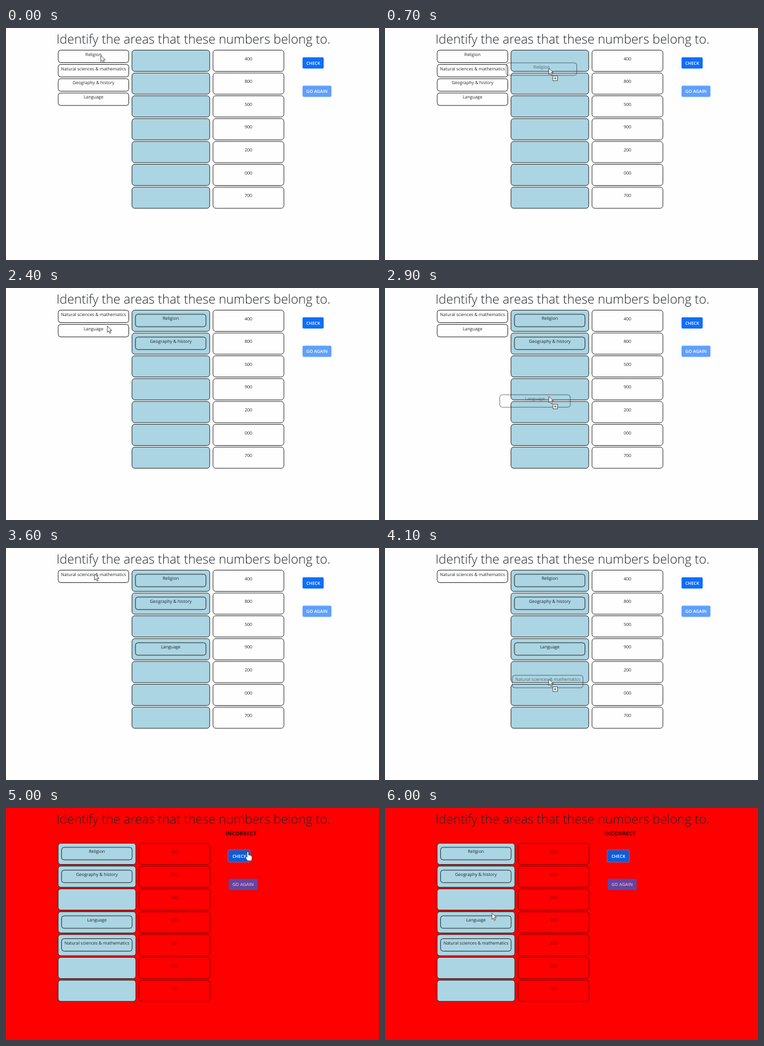
These frames come from a looping animation (600 by 372 pixels, 6.1 s). An HTML page:

```html
<!DOCTYPE html>
<html lang="en">
<head>
<meta charset="utf-8">
<title>Match the numbers</title>
<style>
  html, body { margin: 0; width: 100%; height: 100%; overflow: hidden; background: #fefefe; }
  svg { display: block; width: 600px; height: 372px; background: #fefefe; }
  text { font: 7px "Open Sans", "Noto Sans", sans-serif; fill: #212529; text-anchor: middle; text-rendering: geometricPrecision; }
  .title { font-size: 20.4px; font-weight: 300; }
  .verdict { font-size: 8.8px; font-weight: 700; fill: #3a0508; visibility: hidden; }
  .box { fill: none; stroke: #1c1c1c; stroke-width: .88; }
  .target { fill: #abd5e3; }
  .btn rect { fill: #0d6efd; }
  .btn text { fill: #fff; font-weight: 600; }
  .disabled { opacity: .65; }
  .hover rect { fill: #0b5ed7; }
  .btn .ring { fill: none; stroke: #3184fd; stroke-opacity: .5; stroke-width: 1.8; visibility: hidden; }
  .ghost { opacity: .62; }
  .pointer path, .pointer rect { fill: #fff; stroke: #333; stroke-width: .8; stroke-linejoin: round; }
  .wrong { background: #fe0000; }
  .wrong .value rect { stroke: #700000; }
  .wrong .value text { fill: #8c0008; }
  .wrong .verdict, .wrong .btn .ring { visibility: visible; }
</style>
</head>
<body>
<svg id="stage" viewBox="0 0 600 372">
  <text class="title" x="301.5" y="25">Identify the areas that these numbers belong to.</text>
  <text class="verdict" x="378" y="43.5">INCORRECT</text>
  <g id="board">
    <g class="btn" id="check">
      <rect x="477" y="47" width="34" height="18" rx="1.8"/>
      <rect class="ring" x="476.1" y="46.1" width="35.8" height="19.8" rx="2.6"/>
      <text x="494.2" y="58.6">CHECK</text>
    </g>
    <g class="btn disabled">
      <rect x="477" y="92.4" width="46.5" height="18" rx="1.8"/>
      <text x="500.2" y="104">GO AGAIN</text>
    </g>
  </g>
  <g id="chips"></g>
  <g class="pointer" id="pointer">
    <path id="arrow" d="M0 0V10L2.3 7.9L4 11.8L5.7 11L4 7.2H7.2Z"/>
    <g id="badge">
      <rect x="6.5" y="12.5" width="7.5" height="7.5"/>
      <path d="M8.2 16.25H12.3M10.25 14.2V18.3"/>
    </g>
    <path id="hand" d="M-1.3 9V1.2A1.25 1.25 0 0 1 1.2 1.2V5.4Q2.3 4.6 3.2 5.9Q4.4 5.2 5.1 6.5Q6.8 6.2 6.8 8V11Q6.8 13 5.6 14.8H-.4L-3.6 10Q-4.4 8.4-3.2 8Q-2.2 8-1.3 9Z"/>
  </g>
</svg>
<script>
const LOOP = 6100, STEP = 100, SHIFT_AT = 4200, WRONG_AT = 5000;
const TOP = 35.5, ROW = 36.6, SLOT = 22.9, LEFT = 84;
const $ = id => document.getElementById(id);
const stage = $('stage'), board = $('board');

// In list order; x, y is where the pointer grabs the chip.
const chips = [
  { label: 'Religion', row: 0, grab: 200, drop: 800, x: 152.5, y: 44 },
  { label: 'Natural sciences & mathematics', row: 4, grab: 3600, drop: 4200, x: 142.5, y: 41.5 },
  { label: 'Geography & history', row: 1, grab: 1300, drop: 1800, x: 173, y: 70 },
  { label: 'Language', row: 3, grab: 2400, drop: 3000, x: 163, y: 61 }
];

// The pointer visits every grab and drop, then the button, then drifts off.
const stops = chips.flatMap(c => [
  { t: c.grab, x: c.x, y: c.y },
  { t: c.drop, x: 264, y: TOP + c.row * ROW + 29 }
]).concat(
  { t: 4900, x: 374, y: 55 },
  { t: WRONG_AT, x: 389, y: 70 },
  { t: 6000, x: 172, y: 168.5 }
).sort((a, b) => a.t - b.t);

function pointerAt(t) {
  const i = stops.findIndex(s => s.t > t);
  if (i < 1) return stops.at(i);
  const a = stops[i - 1], b = stops[i];
  const k = 1 - (1 - (t - a.t) / (b.t - a.t)) ** 3;
  return { x: a.x + (b.x - a.x) * k, y: a.y + (b.y - a.y) * k };
}

function add(parent, tag, attrs, label) {
  const el = document.createElementNS('http://www.w3.org/2000/svg', tag);
  for (const key in attrs) el.setAttribute(key, attrs[key]);
  if (label) el.textContent = label;
  return parent.appendChild(el);
}

function move(el, x, y) {
  el.setAttribute('transform', `translate(${x} ${y})`);
}

function show(el, on) {
  el.style.display = on ? '' : 'none';
}

function makeChip(label, cls) {
  const g = add($('chips'), 'g', { class: cls });
  add(g, 'rect', { class: 'box', width: 113.5, height: 20, rx: 4 });
  add(g, 'text', { x: 56.8, y: 9.2 }, label);
  return g;
}

['400', '800', '500', '900', '200', '000', '700'].forEach((number, i) => {
  const y = TOP + i * ROW;
  add(board, 'rect', { class: 'box target', x: 202.7, y, width: 125, height: 34, rx: 4.4 });
  const g = add(board, 'g', { class: 'value' });
  add(g, 'rect', { class: 'box', x: 333, y, width: 114, height: 34, rx: 4.4 });
  add(g, 'text', { x: 390, y: y + 16 }, number);
});

for (const chip of chips) chip.el = makeChip(chip.label, 'chip');
for (const chip of chips) chip.ghost = makeChip(chip.label, 'ghost');

function render(t) {
  const wrong = t >= WRONG_AT;
  const dx = t >= SHIFT_AT ? -118.8 : 0, dy = wrong ? 21 : 0;
  const p = pointerAt(t);
  let slot = 0, dragging = false;

  stage.classList.toggle('wrong', wrong);
  move(board, dx, dy);

  for (const chip of chips) {
    const held = t > chip.grab && t < chip.drop;
    show(chip.ghost, held);
    if (t >= chip.drop) {
      move(chip.el, 208.2 + dx, TOP + 6.6 + chip.row * ROW + dy);
      continue;
    }
    const y = TOP + SLOT * slot++;
    move(chip.el, LEFT, y);
    if (held) {
      move(chip.ghost, LEFT + p.x - chip.x, y + p.y - chip.y);
      dragging = true;
    }
  }

  const bx = p.x - 477 - dx, by = p.y - 47 - dy;
  const over = bx >= 0 && bx <= 34 && by >= 0 && by <= 18;
  $('check').classList.toggle('hover', over || wrong);
  show($('hand'), over);
  show($('arrow'), !over);
  show($('badge'), dragging && p.x > 202);
  move($('pointer'), p.x, p.y);
}

const start = performance.now();
function tick() {
  const t = (performance.now() - start) % LOOP;
  render(Math.floor(t / STEP) * STEP);
  requestAnimationFrame(tick);
}
tick();
</script>
</body>
</html>
```
